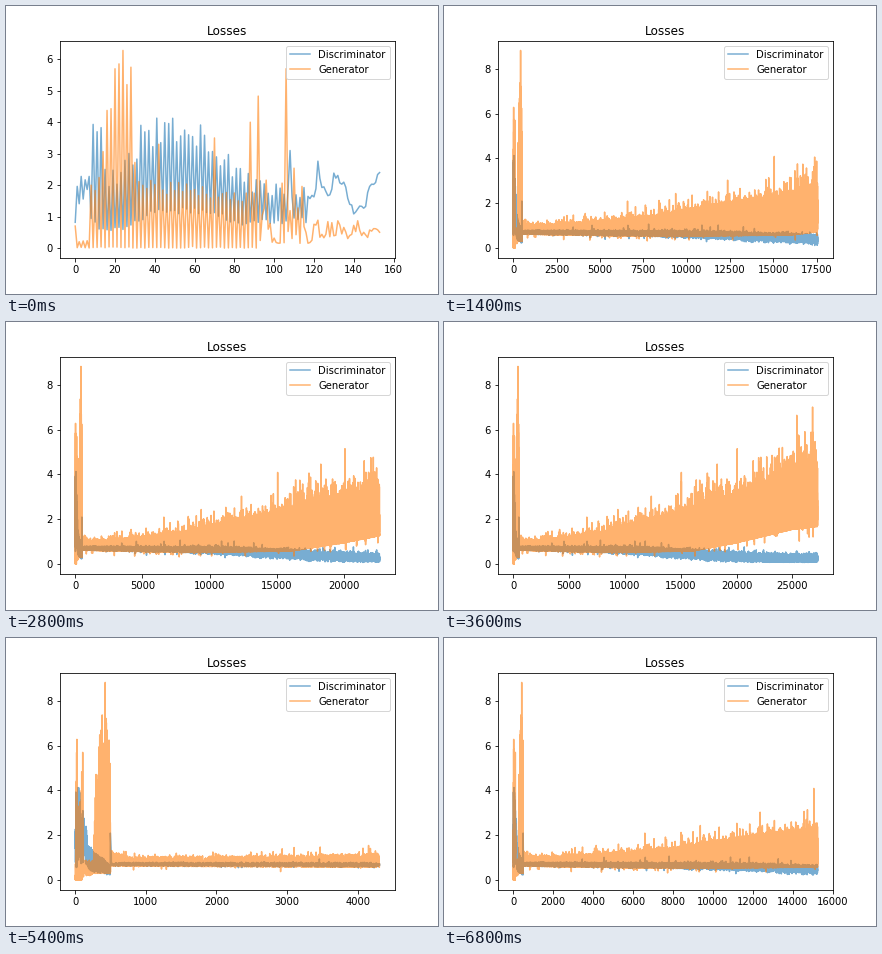
A matplotlib script for the animation above (7 s loop, 432 by 288 pixels).

```python
import numpy as np
import matplotlib.pyplot as plt
from matplotlib.animation import FuncAnimation

BATCHES = 154
FRAMES = 35

plt.rcParams.update({"font.family": "DejaVu Sans", "font.size": 10,
                     "text.kerning_factor": 6})
rng = np.random.default_rng(7)


def curve(x, *points):
    """Straight lines through a few (x, y) points."""
    xs, ys = zip(*points)
    return np.interp(x, xs, ys)


def jitter(like, low, high):
    return rng.uniform(low, high, like.size)


# Epochs appear in the order of their names as text: 1, 10, 100, 101, ...
names = sorted(range(1, 251), key=str)
ranks = curve(np.arange(FRAMES), (0, 0), (3, 4), (10, 28), (13, 44), (14, 53),
              (21, 111), (22, 127), (27, 171), (34, 249))
epochs = [names[int(rank + 1e-6)] for rank in ranks]
t = np.arange(max(epochs) * BATCHES)


def opening(i):
    """First epoch: the two networks swing in opposite phase, then calm."""
    odd = i % 2 == 1
    top = curve(i, (0, 2.2), (7, 2.9), (9, 4), (13, 3.9), (17, 2.3),
                (29, 3.1), (33, 4.1), (63, 4), (75, 3.1), (92, 2.1), (115, 2))
    floor = curve(i, (0, .9), (1, 1.5), (6, 1.7), (8, .9), (12, .58),
                  (26, .65), (38, 1.1), (60, 1.25), (84, .8), (115, .9))
    disc = np.where(odd, top * jitter(i, .78, 1.02),
                    floor * jitter(i, .9, 1.12))
    disc[108] = 3.1
    tail = i >= 117
    disc[tail] = curve(i[tail], (117, 1.6), (121, 1.8), (122, 2.78), (123, 2.15),
                       (128, 1.7), (130, 2.3), (135, 2), (140, 1.15),
                       (146, 1.4), (148, 2), (153, 2.4))
    disc[tail] *= jitter(i[tail], .93, 1.06)
    disc[[0, -1]] = .82, 2.4

    swing = curve(i, (0, .2), (7, .3), (8, 2), (12, 2.4), (16, 5), (20, 6),
                  (28, 5.7), (31, 2.2), (60, 2), (92, 1.8), (119, 1.8))
    gen = np.where(odd, rng.exponential(.015, i.size),
                   swing * jitter(i, .8, 1.02))
    mixed = (i > 92) & (i < 120)
    gen[mixed] = .15 + 2.4 * rng.random(mixed.sum()) ** 2.2
    gen[i >= 120] = jitter(i[i >= 120], .3, .9)
    gen[i >= 148] = jitter(i[i >= 148], .5, .62)
    for at, peak in (0, .7), (24, 6.28), (42, 3.3), (70, 3.5), (88, 4), \
            (92, 4.83), (106, 5.7):
        gen[at] = peak
    return disc, gen


def unstable(i):
    """Fading discriminator and growing generator bursts."""
    disc = curve(i, (154, 2), (175, 1.4), (262, 1), (400, .8), (499, .5))
    disc *= jitter(i, .35, 1.25)
    gen = jitter(i, .2, .9)
    wild = i >= 262
    height = curve(i[wild], (262, 4.6), (400, 7.5), (430, 7.5), (500, 5.5))
    gen[wild] = .3 + height * rng.random(wild.sum()) ** 3
    gen[i == 425] = 8.82
    return np.maximum(disc, .2), gen


def long_run():
    mean = curve(t, (600, .71), (8000, .66), (12000, .58), (15700, .46),
                 (19000, .36), (22700, .27), (33000, .22))
    spread = curve(t, (600, .035), (8000, .055), (16000, .09), (38000, .08))
    disc = mean + spread * rng.standard_normal(t.size)
    jump = rng.random(t.size) < curve(t, (3000, .001), (9000, .008))
    disc += jump * jitter(t, -.25, .35)
    disc = np.maximum(disc, jitter(t, .07, .13))

    low = curve(t, (600, .62), (8000, .52), (16000, .58), (20000, .95),
                (25000, 1.55), (33000, 2))
    high = curve(t, (520, 1.6), (750, 1.2), (3000, 1.3), (5000, 1.5),
                 (8000, 1.85), (11000, 2.4), (15700, 3.2), (19000, 3.85),
                 (22700, 4.4), (25000, 5.2), (28000, 5.7), (38000, 6.6))
    share = .74 * rng.random(t.size) ** 1.7
    burst = rng.random(t.size) < curve(t, (600, .02), (7000, .012),
                                       (13000, .014), (22000, .035))
    share[burst] = .74 + rng.exponential(.11, burst.sum())
    dip = rng.random(t.size) < .008
    gen = low * (1 - dip * jitter(t, 0, .45)) + (high - low) * share
    gen = np.minimum(gen, 8.6)
    gen[36000] = 9.9
    return disc, gen


disc, gen = long_run()
for part, phase in (slice(0, BATCHES), opening), (slice(BATCHES, 500), unstable):
    disc[part], gen[part] = phase(t[part])
disc[497:512] = np.linspace(2.1, 1.1, 15)

fig = plt.figure(figsize=(6, 4), dpi=72, facecolor="white")
fig.subplots_adjust(left=.125, right=.9, bottom=.125, top=.88)
ax = fig.add_subplot()


def draw(frame):
    epoch = epochs[frame]
    n = epoch * BATCHES
    ax.clear()
    ax.plot(disc[:n], color="#1f77b4", alpha=.6, label="Discriminator")
    ax.plot(gen[:n], color="#ff7f0e", alpha=.6, label="Generator")
    ax.set_title("Losses")
    ax.legend(loc="upper center" if epoch > 200 else "upper right")


anim = FuncAnimation(fig, draw, frames=FRAMES, interval=200,
                     repeat=True, repeat_delay=0)
plt.show()
```
